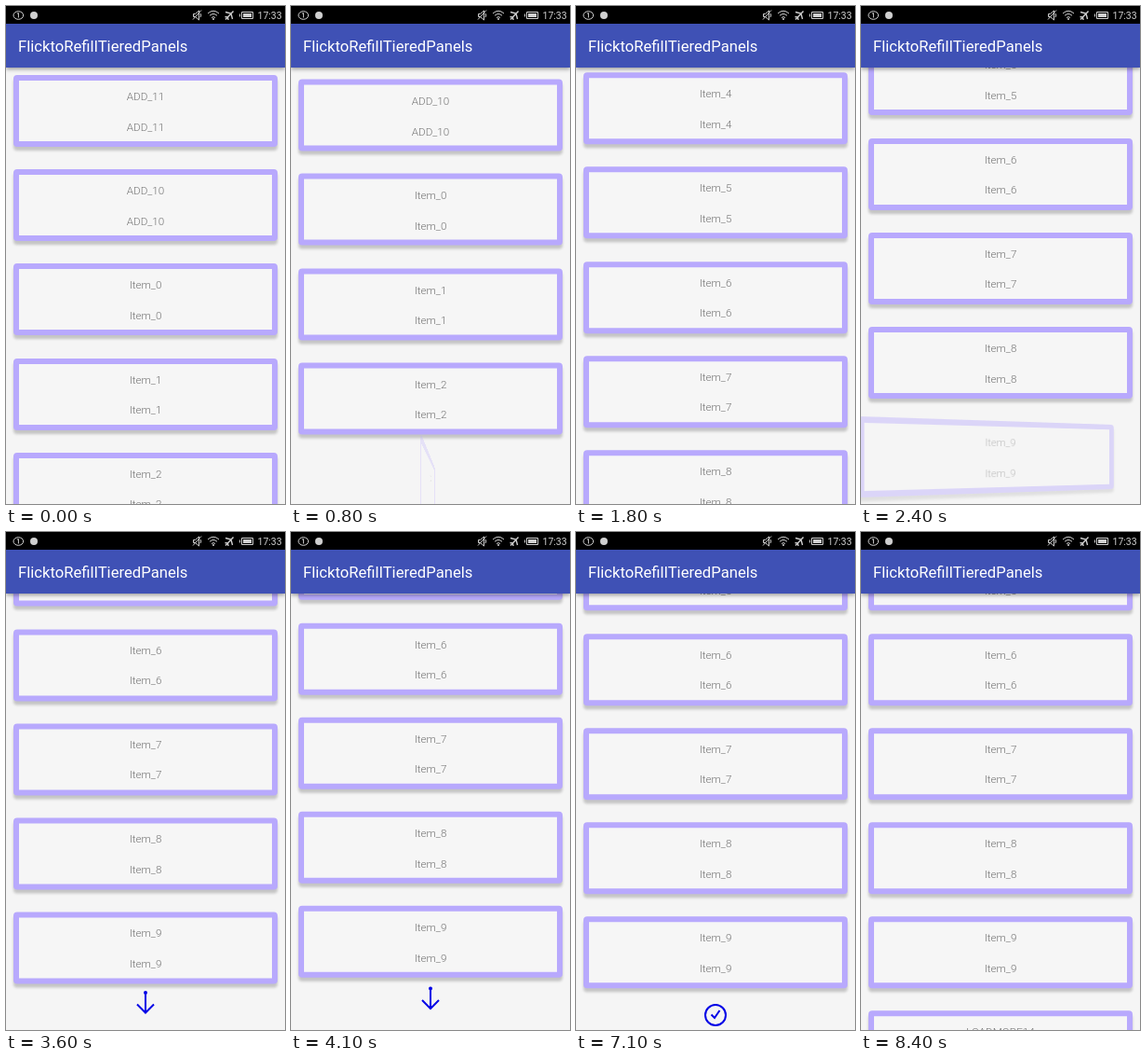
Write an HTML page that moves like this. It is 300x534 px and loops after 8.5 s.

```html
<!DOCTYPE html>
<html lang="en">
<head>
<meta charset="utf-8">
<title>Pull to load more</title>
<style>
  html, body { margin: 0; width: 100%; height: 100%; overflow: hidden; background: #f5f5f5; }
  body { position: relative; font-family: Roboto, sans-serif; }
  #status { position: absolute; left: 0; top: 0; width: 300px; height: 19px; z-index: 3; background: #000; }
  #bar {
    position: absolute; left: 0; top: 19px; width: 300px; height: 47px; z-index: 2; box-sizing: border-box;
    padding-left: 13px; background: #3f51b5; color: #fff; font-size: 16.67px; line-height: 49px;
    white-space: nowrap; box-shadow: 0 2px 4px rgba(0, 0, 0, .35);
  }
  #list { position: absolute; left: 0; top: 0; width: 300px; }
  .card {
    position: absolute; left: 8px; width: 284px; height: 77px; box-sizing: border-box;
    border: 6px solid #b8a9fd; border-radius: 4px; background: #f6f6f6;
    box-shadow: 0 4px 3px rgba(0, 0, 0, .2);
    color: #747474; font-size: 11.67px; font-weight: 300; text-align: center;
  }
  .card span { position: absolute; left: 0; right: 0; top: 8px; line-height: 18px; }
  .card span + span { top: 40.5px; }
  svg { position: absolute; left: 0; top: 0; }
  #foot { fill: none; stroke: #0000e6; stroke-width: 2; }
</style>
</head>
<body>
<div id="list"></div>
<svg id="foot" width="300" height="534">
  <g id="mark">
    <path id="stem"/>
    <circle id="dot" cy="-10.5" r="1" fill="#0000e6"/>
    <path id="head"/>
    <circle id="ring" r="11" pathLength="360"/>
    <path id="tick"/>
  </g>
</svg>
<div id="bar">FlicktoRefillTieredPanels</div>
<div id="status">
  <svg width="300" height="19" fill="none" stroke="#d0d0d0">
    <ellipse cx="13.3" cy="10" rx="5.3" ry="4.3"/>
    <path d="M12 8.2l1.4-.7v5"/>
    <circle cx="30" cy="10" r="4" fill="#d0d0d0" stroke="none"/>
    <path d="M201.500 8.500h2l4-3.500v10l-4-3.500h-2zM201 14.500l9-10M209 8q1.500 2 0 4"/>
    <path d="M217 8q6-5.500 12 0M219 10.300q4-3.600 8 0M221 12.500q2-1.800 4 0"/>
    <circle cx="223" cy="14" r="1" fill="#d0d0d0" stroke="none"/>
    <path d="M236 14.500l8.500-9M236 6.500l6 1.500 1.500 6M235.500 11.500l3 .5 .5 3" stroke-width="1.4"/>
    <path d="M253.500 6.500h12v7h-12zM251.500 8.500v3"/>
    <path d="M255 8h9v4h-9z" fill="#d0d0d0" stroke="none"/>
    <text x="270.500" y="13.700" font-size="10.500" font-family="Roboto, sans-serif" fill="#d0d0d0" stroke="none">17:33</text>
  </svg>
</div>
<script>
const LOOP = 8500, STEP = 100, FLIP = 800, PITCH = 101.2;
const $ = id => document.getElementById(id);

// Piecewise linear value from [time, value] steps
function at(steps, t) {
  if (t <= steps[0][0]) return steps[0][1];
  for (let i = 1; i < steps.length; i++) {
    const [a, x] = steps[i - 1], [b, y] = steps[i];
    if (t <= b) return x + (y - x) * (t - a) / (b - a);
  }
  return steps[steps.length - 1][1];
}

const scroll = [
  [500, 0], [600, 12], [750, 46], [850, 147], [950, 440], [1050, 530], [1200, 559],
  [1500, 585], [1900, 618], [2140, 653], [2300, 728], [2400, 742], [2600, 742],
  [3300, 766], [3600, 779.6], [4000, 790], [4400, 774.8]
];
const angle = [[0, 90], [1 / 3, -15], [2 / 3, 15], [1, 0]];

// Time at which each later card starts to flip in
const starts = { 5: 754, 6: 851, 7: 888, 8: 917, 9: 942, 10: 944, 11: 2144, 12: 7600 };
const names = ['ADD_11', 'ADD_10'];
for (let i = 0; i < 10; i++) names.push('Item_' + i);
names.push('LOADMORE14');

const cards = names.map((name, i) => {
  const el = document.createElement('div');
  el.className = 'card';
  el.style.top = 74 + PITCH * i + 'px';
  el.innerHTML = `<span>${name}</span><span>${name}</span>`;
  $('list').append(el);
  return { el, start: starts[i] };
});

function flip({ el, start }, t) {
  if (start === undefined) return;
  const p = Math.min(1, Math.max(0, (t - start) / FLIP));
  const u = (1 - Math.cos(Math.PI * p)) / 2;
  el.style.visibility = p > 0 ? 'visible' : 'hidden';
  el.style.opacity = .25 + .75 * u;
  el.style.transform = p < 1 ? `perspective(355px) rotateY(${at(angle, u)}deg)` : 'none';
}

function footer(t, s) {
  $('foot').style.display = t >= 2600 && t < 7600 ? '' : 'none';
  const y = t <= 4000 ? 1284.1 - s : at([[4000, 494.1], [4400, 518]], t);
  $('mark').setAttribute('transform', `translate(150 ${y})`);

  // The arrow folds its head, then its stem runs into the ring
  const top = at([[4500, -11], [4800, -5], [5100, 11]], t);
  $('stem').setAttribute('d', top < 11 ? `M0 ${top}V11` : '');
  $('dot').style.display = t < 4500 ? '' : 'none';
  const w = at([[4400, 9], [4600, 0]], t);
  $('head').setAttribute('d', w > 0 ? `M${-w} ${11 - w}L0 11L${w} ${11 - w}` : '');

  const lead = at([[4500, 0], [6600, 630]], t);
  const tail = Math.min(270, Math.max(0, lead - 270));
  const ring = $('ring');
  ring.style.display = lead > 0 ? '' : 'none';
  ring.setAttribute('stroke-dasharray', `${lead - tail} 360`);
  ring.setAttribute('transform', `rotate(${90 + tail})`);

  const a = at([[6600, 0], [6800, 1]], t), b = at([[6800, 0], [7100, 1]], t);
  $('tick').setAttribute('d', a > 0
    ? `M-4.500 -.500l${3.5 * a} ${3.5 * a}` + (b > 0 ? `l${5.5 * b} ${-8 * b}` : '')
    : '');
}

function draw(now) {
  const t = Math.floor(now % LOOP / STEP) * STEP;
  const s = t < 600 ? 0 : at(scroll, t);
  $('list').style.transform = `translateY(${-s}px)`;
  cards.forEach(c => flip(c, t));
  footer(t, s);
}

const begin = performance.now();
function tick() {
  draw(performance.now() - begin);
  requestAnimationFrame(tick);
}
tick();
</script>
</body>
</html>
```
